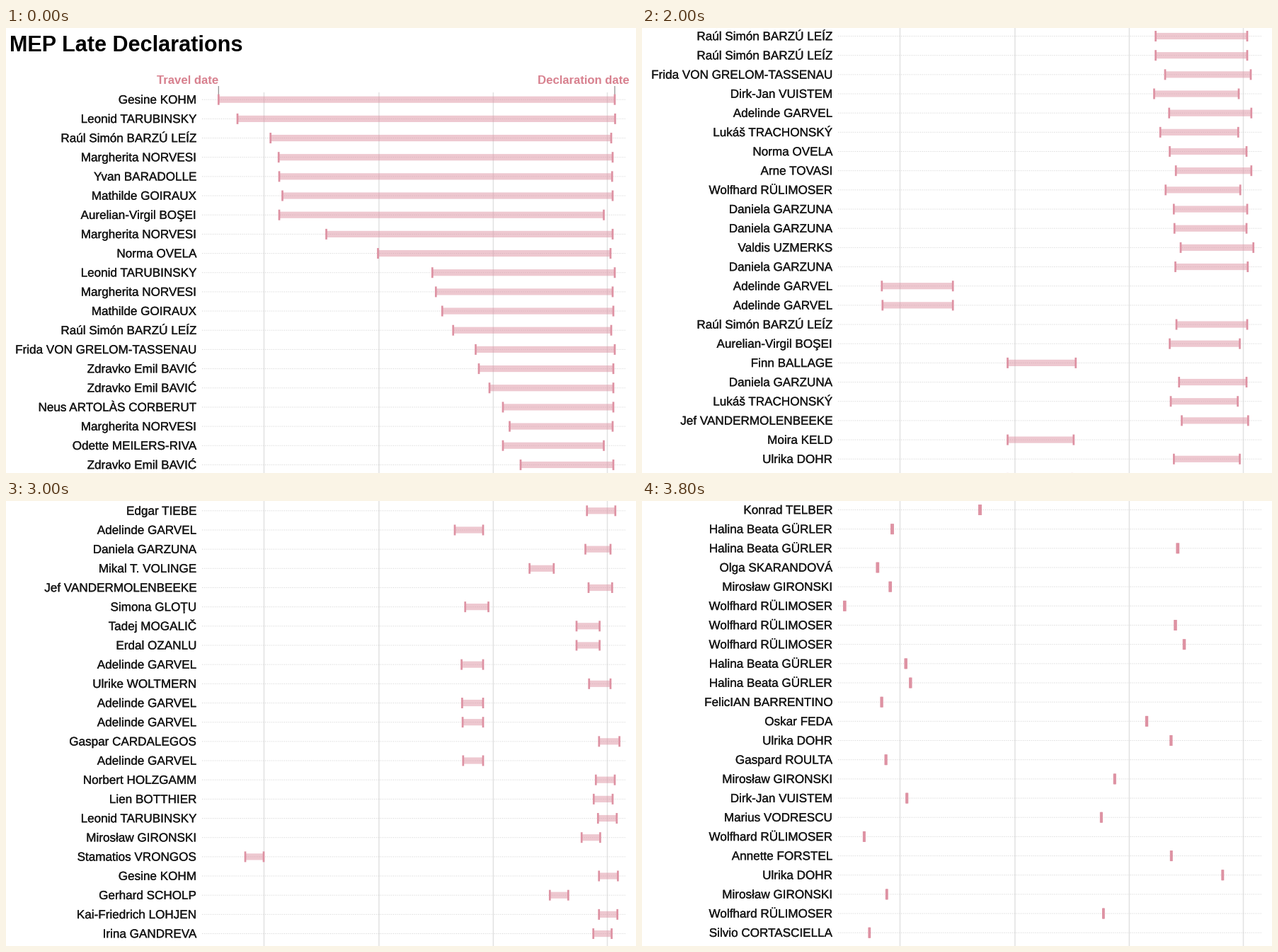
These frames come from a looping animation (890x629 px, 4000 ms). A matplotlib script:

```python
import matplotlib.pyplot as plt
from matplotlib.animation import ArtistAnimation
from matplotlib.patheffects import withStroke

W, H, DPI = 890, 629, 64
PT = 72 / DPI  # points per pixel
PITCH = 27.17
STEP_MS = 500
HOLD = 4  # steps spent on the first page

PINK = "#de92a3"
HEAD = "#d8818f"
INK = "#181818"
GRID = "#e2e2e2"
DOTS = "#d2d2d2"
GRID_X = (364.5, 526.9, 688.4, 849.5)

# (name, travel date, declaration date), dates as x positions
LONGEST = [
    ("Gesine KOHM", 300.3, 860),
    ("Leonid TARUBINSKY", 327, 860.5),
    ("Raúl Simón BARZÚ LEÍZ", 373.7, 855),
    ("Margherita NORVESI", 385.2, 857),
    ("Yvan BARADOLLE", 386, 856.3),
    ("Mathilde GOIRAUX", 390.5, 857),
    ("Aurelian-Virgil BOŞEI", 386, 844.5),
    ("Margherita NORVESI", 452.5, 857),
    ("Norma OVELA", 525.5, 854),
    ("Leonid TARUBINSKY", 602.3, 860),
    ("Margherita NORVESI", 607.3, 857),
    ("Mathilde GOIRAUX", 616.3, 858),
    ("Raúl Simón BARZÚ LEÍZ", 631.7, 855),
    ("Frida VON GRELOM-TASSENAU", 663.5, 860),
    ("Zdravko Emil BAVIĆ", 668, 858),
    ("Zdravko Emil BAVIĆ", 683, 858),
    ("Neus ARTOLÀS CORBERUT", 702, 858),
    ("Margherita NORVESI", 711.5, 857),
    ("Odette MEILERS-RIVA", 702, 844.5),
    ("Zdravko Emil BAVIĆ", 727, 858),
]
LONG = [
    ("Raúl Simón BARZÚ LEÍZ", 725.6, 855),
    ("Raúl Simón BARZÚ LEÍZ", 725.6, 855),
    ("Frida VON GRELOM-TASSENAU", 739, 860),
    ("Dirk-Jan VUISTEM", 723.5, 843),
    ("Adelinde GARVEL", 744.7, 860.8),
    ("Lukáš TRACHONSKÝ", 732.2, 842.3),
    ("Norma OVELA", 745.5, 854),
    ("Arne TOVASI", 754.2, 860.8),
    ("Wolfhard RÜLIMOSER", 739.7, 845.2),
    ("Daniela GARZUNA", 751.3, 855),
    ("Daniela GARZUNA", 752.2, 854),
    ("Valdis UZMERKS", 761, 863.7),
    ("Daniela GARZUNA", 753.5, 855.7),
    ("Adelinde GARVEL", 338.8, 439.2),
    ("Adelinde GARVEL", 339.8, 439.2),
    ("Raúl Simón BARZÚ LEÍZ", 755, 855),
    ("Aurelian-Virgil BOŞEI", 745.5, 844.5),
    ("Finn BALLAGE", 516.5, 612.7),
    ("Daniela GARZUNA", 758.7, 854),
    ("Lukáš TRACHONSKÝ", 747, 841.6),
    ("Jef VANDERMOLENBEEKE", 762.5, 856.3),
    ("Moira KELD", 516.5, 609.8),
    ("Ulrika DOHR", 751.4, 844.5),
    ("Beni POREDA", 516.5, 607.5),
]
MEDIUM = [
    ("Beni POREDA", 516.5, 607.5),
    ("Heiko GÖLSEM", 334.3, 416.5),
    ("Ilka MORANCEY-STALENBERG", 792, 860.8),
    ("Frida VON GRELOM-TASSENAU", 792, 860),
    ("Renate DOLMARN", 753.5, 821),
    ("Cassandra REEKE", 796.5, 860.8),
    ("Jef VANDERMOLENBEEKE", 794.2, 856.3),
    ("Frida VON GRELOM-TASSENAU", 798.6, 860),
    ("Konrad TELBER", 799.4, 860),
    ("Emilio GÁMEZ-OLTÁRIZ BRINE", 804.4, 864.5),
    ("Adelinde GARVEL", 803.7, 860.8),
    ("Ute MELKER", 286.3, 343.6),
    ("Aurélie VOYET", 367.5, 424.6),
    ("Torben GERVER", 805.2, 860),
    ("Lovi ENDIR", 809, 861.5),
    ("Ornella LUSARTI", 800.8, 851.5),
    ("Olaf BURKHALDT", 373.5, 421.7),
    ("Emil COTUȚA", 795, 843),
    ("Gudrun VELHOVER", 814, 861.5),
    ("Adelinde GARVEL", 628, 674),
    ("Leonid TARUBINSKY", 815.6, 860.6),
    ("Norbert HOLZGAMM", 814.8, 860),
    ("Birgit RABENSTIEGEN", 814.8, 860),
]
SHORT = [
    ("Edgar TIEBE", 820.7, 860.8),
    ("Adelinde GARVEL", 634, 674),
    ("Daniela GARZUNA", 818.5, 854),
    ("Mikal T. VOLINGE", 739.6, 773.8),
    ("Jef VANDERMOLENBEEKE", 823, 856.3),
    ("Simona GLOȚU", 648.7, 681.5),
    ("Tadej MOGALIČ", 806, 838.6),
    ("Erdal OZANLU", 806, 838.6),
    ("Adelinde GARVEL", 643.6, 674),
    ("Ulrike WOLTMERN", 823.7, 854),
    ("Adelinde GARVEL", 644.4, 674),
    ("Adelinde GARVEL", 645.1, 674),
    ("Gaspar CARDALEGOS", 837.8, 866.6),
    ("Adelinde GARVEL", 645.8, 674),
    ("Norbert HOLZGAMM", 833.3, 860),
    ("Lien BOTTHIER", 830.3, 857),
    ("Leonid TARUBINSKY", 836.3, 862.8),
    ("Mirosław GIRONSKI", 813.2, 839.4),
    ("Stamatios VRONGOS", 338, 364),
    ("Gesine KOHM", 837.7, 864.4),
    ("Gerhard SCHOLP", 768.3, 794.3),
    ("Kai-Friedrich LOHJEN", 837.7, 863.7),
    ("Irina GANDREVA", 829.7, 855.6),
    ("Pavel ŽARKOČAN", 829.7, 855.6),
]
# mid points of the shortest spans
BRIEF = [
    ("Konrad TELBER", 477.5),
    ("Halina Beata GÜRLER", 353.5),
    ("Halina Beata GÜRLER", 756.8),
    ("Olga SKARANDOVÁ", 332.8),
    ("Mirosław GIRONSKI", 350.7),
    ("Wolfhard RÜLIMOSER", 286.3),
    ("Wolfhard RÜLIMOSER", 753.5),
    ("Wolfhard RÜLIMOSER", 766),
    ("Halina Beata GÜRLER", 372.7),
    ("Halina Beata GÜRLER", 379.3),
    ("FelicIAN BARRENTINO", 338.6),
    ("Oskar FEDA", 713),
    ("Ulrika DOHR", 747.4),
    ("Gaspard ROULTA", 344.6),
    ("Mirosław GIRONSKI", 667.8),
    ("Dirk-Jan VUISTEM", 374.2),
    ("Marius VODRESCU", 648.9),
    ("Wolfhard RÜLIMOSER", 313.9),
    ("Annette FORSTEL", 747.8),
    ("Ulrika DOHR", 820.3),
    ("Mirosław GIRONSKI", 345.8),
    ("Wolfhard RÜLIMOSER", 651.9),
    ("Silvio CORTASCIELLA", 321.3),
]


def widen(rows):
    """Turn mid points into spans that shrink slowly down the list."""
    for i, (name, mid) in enumerate(rows):
        half = 1.1 - 0.025 * i
        yield name, mid - half, mid + half


plt.rcParams["font.family"] = ["Liberation Sans", "DejaVu Sans"]
fig = plt.figure(figsize=(W / DPI, H / DPI), dpi=DPI, facecolor="white")
ax = fig.add_axes([0, 0, 1, 1])
ax.set(xlim=(0, W), ylim=(H, 0))
ax.axis("off")

# slightly heavier strokes for the row names
THICKEN = [withStroke(linewidth=0.3 * PT, foreground=INK)]


def label(x, y, text, px, color=INK, ha="right", **style):
    return ax.text(x, y, text, fontsize=px * PT, color=color, ha=ha,
                   va="baseline", **style)


def vlines(xs, y0, y1, color, width, z):
    return ax.vlines(xs, y0, y1, colors=color, lw=width * PT, zorder=z, snap=False)


def hlines(ys, x0, x1, color, width, z, **style):
    return ax.hlines(ys, x0, x1, colors=color, lw=width * PT, zorder=z,
                     snap=False, **style)


def page(rows, first_y, grid_top=0):
    names, starts, ends = zip(*rows)
    ys = [first_y + PITCH * i for i in range(len(names))]
    tops, bottoms = [y - 7.5 for y in ys], [y + 7.5 for y in ys]
    art = [
        vlines(GRID_X, grid_top, H, GRID, 1.5, 1),
        hlines(ys, 277, 875, DOTS, 1, 1, linestyles=(0, (1, 1.7))),
        hlines(ys, starts, ends, PINK, 9.2, 2, alpha=0.5),
        vlines(starts, tops, bottoms, PINK, 2.7, 3),
        vlines(ends, tops, bottoms, PINK, 2.7, 3),
    ]
    art += [label(269.5, y + 5.7, n, 17.1, path_effects=THICKEN)
            for n, y in zip(names, ys)]
    return art


def header():
    return [
        label(5, 33, "MEP Late Declarations", 30.6, "black", "left", weight="bold"),
        label(300.5, 79, "Travel date", 16.7, HEAD, weight="bold"),
        label(880.5, 79, "Declaration date", 16.7, HEAD, weight="bold"),
        vlines((300.3, 860), 82, 94, "#8c8c8c", 1.2, 2),
    ]


pages = [
    page(LONGEST, 101.2, 91) + header(),
    page(LONG, 11.5),
    page(MEDIUM, 13),
    page(SHORT, 13.8),
    page(list(widen(BRIEF)), 12.5),
]
steps = [pages[0]] * HOLD + pages[1:]
anim = ArtistAnimation(fig, steps, interval=STEP_MS, repeat=True,
                       repeat_delay=0, blit=False)
plt.show()
```
